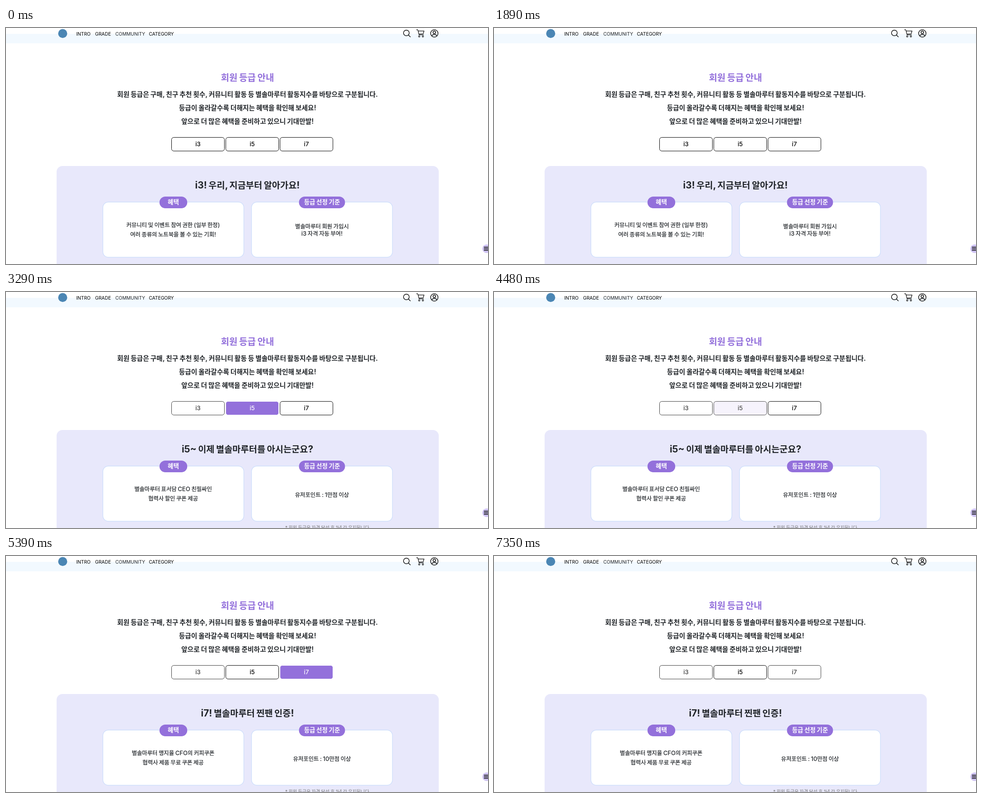
Write an HTML page that moves like this. It is 1067 px wide and 525 px high and loops after 7420 ms.

```html
<!DOCTYPE html>
<html lang="ko">
<head>
<meta charset="utf-8">
<title>회원 등급 안내</title>
<style>
  html, body { margin: 0; width: 100%; height: 100%; overflow: hidden; background: #fff; }
  svg { display: block; }
  text { font-family: Inter, "Noto Sans CJK KR", "Noto Sans CJK", sans-serif; word-spacing: -.07em; }
  .ko { font-family: "Noto Sans CJK KR", "Noto Sans CJK", sans-serif; font-size: .945em; }
  .medium .ko { stroke: currentColor; stroke-width: .25; }
  .icon { fill: none; stroke: #111; stroke-width: 1.5; stroke-linecap: round; stroke-linejoin: round; }
</style>
</head>
<body>
<svg id="stage" width="1067" height="525" viewBox="0 0 1067 525"></svg>
<script>
const LOOP = 7420, STEP = 70, FADE = 150;
const INK = '#212529', PURPLE = '#9370db';
const stage = document.getElementById('stage');

const label = (str, x, y, size, weight = 400, fill = INK, anchor = 'middle') =>
  `<text x="${x}" y="${y}" font-size="${size}" font-weight="${weight}" fill="${fill}" color="${fill}"` +
  ` text-anchor="${anchor}" class="${weight === 500 ? 'medium' : ''}">` +
  str.replace(/[가-힣]+/g, '<tspan class="ko">$&</tspan>') + '</text>';

const box = (x, y, w, h, r, fill, more = '') =>
  `<rect x="${x}" y="${y}" width="${w}" height="${h}" rx="${r}" fill="${fill}" ${more}/>`;

const card = (x, title, badgeWidth) =>
  box(x, 387.3, 312, 122.7, 12, '#fff', 'stroke="#cfdffb" stroke-width="1.4"') +
  box(x + 156 - badgeWidth / 2, 375, badgeWidth, 26, 13, PURPLE) +
  label(title, x + 156, 392.4, 14.3, 600, '#fff');

// Each grade: heading, benefit lines, criteria lines.
const grades = [
  ['i3! 우리, 지금부터 알아가요!',
    ['커뮤니티 및 이벤트 참여 권한 (일부 한정)', '여러 종류의 노트북을 볼 수 있는 기회!'],
    ['별솔마루터 회원 가입시', 'i3 자격 자동 부여!']],
  ['i5~ 이제 별솔마루터를 아시는군요?',
    ['별솔마루터 표서담 CEO 친필싸인', '협력사 할인 쿠폰 제공'],
    ['유저포인트 : 1만점 이상']],
  ['i7! 별솔마루터 찐팬 인증!',
    ['별솔마루터 맹지율 CFO의 커피쿠폰', '협력사 제품 무료 쿠폰 제공'],
    ['유저포인트 : 10만점 이상']]
];

const gradeView = ([heading, benefits, criteria], i) => `<g class="grade">` +
  label(heading, 534.5, 356.7, 20.9, 700) +
  benefits.map((s, n) => label(s, 370, 442.8 + 21 * n, 13.1, 500)).join('') +
  criteria.map((s, n) => label(s, 699.5, (i ? 455.8 : 445.8) + 16 * n, 13.1, 500)).join('') +
  (i ? label('* 회원 등급은 자격 달성 후 1년 간 유지됩니다.', 712.5, 528, 10.7, 400, '#777') : '') + '</g>';

// Hover span and the time during which the idle ink stays slightly softer.
const buttons = [
  { name: 'i3', hover: [2275, 2406], soft: [2275, LOOP] },
  { name: 'i5', hover: [2406, 4357], soft: [2406, 5200] },
  { name: 'i7', hover: [4716, 5827], soft: [4716, LOOP] }
];

stage.innerHTML =
  box(0, 13, 1067, 21, 0, '#f2f9ff') +
  '<circle cx="125.5" cy="12.3" r="10" fill="#4b86b4"/>' +
  [['INTRO', 155.5], ['GRADE', 197.3], ['COMMUNITY', 242], ['CATEGORY', 316.3]]
    .map(([s, x]) => label(s, x, 16.7, 10.3, 400, s === 'COMMUNITY' ? INK : '#000', 'start')).join('') +
  `<g class="icon">
    <circle cx="886.3" cy="11" r="6.3"/><path d="M891 15.7l4 4"/>
    <path d="M908.7 3.8h2.8l3 11.4h9.6M912.2 6.6h13.2l-1.9 6.2-9.6.8" stroke-width="1.3"/>
    <circle cx="914.8" cy="18.6" r="1.6" stroke-width="1.2"/><circle cx="922.8" cy="18.6" r="1.6" stroke-width="1.2"/>
    <circle cx="948.2" cy="12" r="8.2"/><circle cx="948.2" cy="9.7" r="2.9"/>
    <path d="M942.6 17.6q1.2-3 5.6-3t5.6 3"/>
  </g>` +
  label('회원 등급 안내', 534.5, 117.5, 21.2, 700, PURPLE) +
  ['회원 등급은 구매, 친구 추천 횟수, 커뮤니티 활동 등 별솔마루터 활동지수를 바탕으로 구분됩니다.',
    '등급이 올라갈수록 더해지는 혜택을 확인해 보세요!',
    '앞으로 더 많은 혜택을 준비하고 있으니 기대만발!']
    .map((s, n) => label(s, 534.7, 152.6 + 30 * n, 15.6, 600)).join('') +
  buttons.map((b, i) => '<g class="button">' +
    box(366.5 + 120.1 * i, 243.4, 117, 30.3, 5, '#fff', 'stroke="#000"') +
    label(b.name, 425 + 120 * i, 263.2, 13.1, 500, '#000') + '</g>').join('') +
  box(112, 307, 846, 240, 13, '#e8e8fb') +
  card(214.5, '혜택', 61.5) + card(543.5, '등급 선정 기준', 102) +
  grades.map(gradeView).join('') +
  '<circle cx="1064" cy="491" r="9.5" fill="#cfc3f3"/>' +
  '<path d="M1058 487.6h9M1058 491h9M1058 494.4h9" stroke="#111" stroke-width="1.7"/>';

const gradeNodes = stage.querySelectorAll('.grade');
const buttonNodes = stage.querySelectorAll('.button');

const ramp = (t, start) => {
  const p = Math.min(1, Math.max(0, (t - start) / FADE));
  return p * p * (3 - 2 * p);
};
const mix = (from, to, k) => `rgb(${from.map((v, i) => Math.round(v + (to[i] - v) * k))})`;
const WHITE = [255, 255, 255], VIOLET = [147, 112, 219];

function draw(now) {
  const t = Math.floor((now % LOOP) / STEP) * STEP;
  const current = t < 3290 ? 0 : t < 5250 ? 1 : 2;
  gradeNodes.forEach((node, i) => node.style.display = i === current ? '' : 'none');
  buttons.forEach(({ hover, soft }, i) => {
    const [rect, text] = buttonNodes[i].children;
    const k = Math.min(ramp(t, hover[0]), 1 - ramp(t, hover[1]));
    const base = Array(3).fill(60 * (ramp(t, soft[0]) - ramp(t, soft[1])));
    const ink = mix(base, WHITE, k);
    rect.setAttribute('fill', mix(WHITE, VIOLET, k));
    rect.setAttribute('stroke', ink);
    text.setAttribute('fill', ink);
  });
  requestAnimationFrame(draw);
}
draw(performance.now());
</script>
</body>
</html>
```
